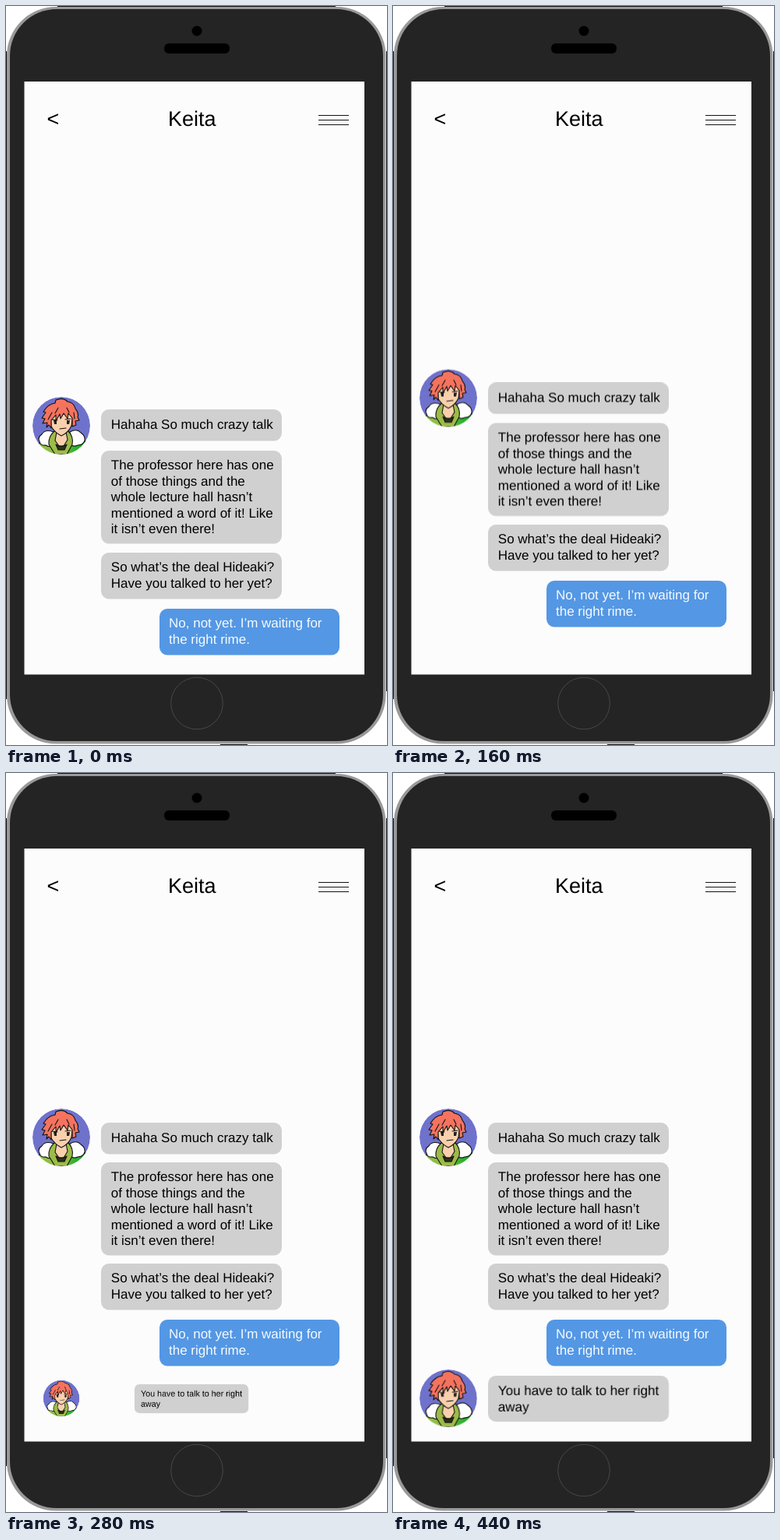
These frames come from a looping animation (489 by 949 pixels, 600 ms). An HTML page:

```html
<!DOCTYPE html>
<html lang="en">
<head>
<meta charset="utf-8">
<title>Chat</title>
<style>
  html, body { margin: 0; width: 100%; height: 100%; overflow: hidden; background: #fff; }
  svg { display: block; }
  text { font: 17px "Liberation Sans", Arial, sans-serif; text-rendering: geometricPrecision; }
  .title { font-size: 27px; }
  .bubble { fill: #d0d0d0; }
  .sent .bubble { fill: #5497e4; }
  .sent text { fill: #f6faff; }
  .ink { stroke: #111; stroke-width: 1.1; stroke-linejoin: round; stroke-linecap: round; }

  .scroll { animation: scroll 600ms infinite; }
  .pop { animation: pop 600ms infinite; }

  @keyframes scroll {
    0% { transform: translateY(0); }
    13.33% { transform: translateY(0); animation-timing-function: steps(6, start); }
    53.33%, 100% { transform: translateY(var(--dy)); }
  }
  @keyframes pop {
    0% { transform: scale(0); }
    33.33% { transform: scale(0); animation-timing-function: steps(5, start); }
    66.66% { transform: scale(1.05); animation-timing-function: steps(2, start); }
    80%, 100% { transform: scale(1); }
  }
</style>
</head>
<body>
<svg width="489" height="949" viewBox="0 0 489 949">
  <defs>
    <clipPath id="disc"><circle r="37"/></clipPath>
    <linearGradient id="jacket">
      <stop offset=".35" stop-color="#8fbf45"/>
      <stop offset=".8" stop-color="#25b02c"/>
    </linearGradient>
    <g id="avatar" clip-path="url(#disc)">
      <circle r="37" fill="#6f72cb"/>
      <path class="ink" fill="url(#jacket)" d="M-30 24L-12 10H14L34 22V40H-30Z"/>
      <path class="ink" fill="#fff" d="M-10 8Q-21 4-25 11Q-31 15-28 20Q-27 26-20 25Q-14 29-10 24Z"/>
      <path class="ink" fill="#fff" d="M11 8Q20 3 25 9Q31 13 30 19Q28 25 21 25Q15 28 11 23Z"/>
      <path class="ink" fill="#9dbb48" d="M-9 7Q-17 14-16 24L-8 37H7L14 24Q16 14 9 7Z"/>
      <path class="ink" fill="#f9d0ad" d="M-6 8L-8 19L-3 26H3L8 18L6 8Z"/>
      <path class="ink" fill="#2c3319" d="M-7 24Q0 29 7 24L4 31H-4Z"/>
      <path class="ink" fill="#f9d0ad" d="M-14-15L-13 1Q-8 9 0 13Q9 9 13 0L15-15Z"/>
      <path class="ink" fill="none" d="M-12-8l7 1M5-8l7-1M-2 4l8-1"/>
      <path fill="#222" d="M-10-7h4v5h-3zM7-7h4l-1 5h-3z"/>
      <path class="ink" fill="#f4735f" d="M-13 3L-16-1L-19 2L-18-4L-24-3L-21-9L-25-10L-20-17L-23-18
        Q-17-28-8-29L-7-33Q2-37 8-31Q16-30 18-22Q23-16 21-11L23-7L18-6L19-1L14 1L14-10L9-16L8-9L3-16
        L-1-9L-2-15L-7-6L-7-14L-13-7Z"/>
      <path class="ink" fill="none" d="M-17-8l5-9M-8-16l4-7M10-17l-3-6M17-9l-1-8"/>
    </g>
  </defs>

  <!-- phone -->
  <path d="M66 .5H423M.5 58V890M488.5 58V880M275 948.5H310" stroke="#111"/>
  <rect x="1" y="1" width="486.500" height="946.500" rx="63" fill="#999"/>
  <rect x="5" y="4" width="479" height="940" rx="60" fill="#242424"/>
  <circle cx="245" cy="32" r="6.500"/>
  <rect x="203" y="48" width="84" height="13" rx="6"/>
  <circle cx="245" cy="895.500" r="33.300" fill="none" stroke="#484848"/>
  <rect x="23.500" y="97" width="436.500" height="761.500" fill="#fcfcfc"/>

  <!-- header -->
  <text class="title" x="52.500" y="154">&lt;</text>
  <text class="title" x="208" y="154">Keita</text>
  <path d="M401 140.500H440M401 146.500H440M401 152.500H440" stroke="#111"/>

  <!-- messages -->
  <g class="scroll" style="--dy: -71px"><use href="#avatar" x="71" y="539"/></g>
  <g class="scroll" style="--dy: -69px">
    <rect class="bubble" x="122" y="518" width="232" height="40.500" rx="10"/>
    <text x="134.800" y="543">Hahaha So much crazy talk</text>
  </g>
  <g class="scroll" style="--dy: -71px">
    <rect class="bubble" x="122" y="571" width="232" height="119.500" rx="10"/>
    <text y="595">
      <tspan x="134.800">The professor here has one</tspan>
      <tspan x="134.800" dy="20.500">of those things and the</tspan>
      <tspan x="134.800" dy="20.500">whole lecture hall hasn’t</tspan>
      <tspan x="134.800" dy="20.500">mentioned a word of it! Like</tspan>
      <tspan x="134.800" dy="20.500">it isn’t even there!</tspan>
    </text>
  </g>
  <g class="scroll" style="--dy: -72px">
    <rect class="bubble" x="122" y="702" width="232" height="59.500" rx="10"/>
    <text y="726">
      <tspan x="134.800">So what’s the deal Hideaki?</tspan>
      <tspan x="134.800" dy="20.500">Have you talked to her yet?</tspan>
    </text>
  </g>
  <g class="scroll sent" style="--dy: -72px">
    <rect class="bubble" x="197" y="774" width="231" height="59.500" rx="10"/>
    <text y="798">
      <tspan x="209">No, not yet. I’m waiting for</tspan>
      <tspan x="209" dy="20.500">the right rime.</tspan>
    </text>
  </g>

  <!-- incoming reply -->
  <g class="pop" style="transform-origin: 71px 803px"><use href="#avatar" x="71" y="803"/></g>
  <g class="pop" style="transform-origin: 238px 803.500px">
    <rect class="bubble" x="122" y="774" width="232" height="59" rx="10"/>
    <text y="799">
      <tspan x="134.800">You have to talk to her right</tspan>
      <tspan x="134.800" dy="20.500">away</tspan>
    </text>
  </g>
</svg>
</body>
</html>
```
